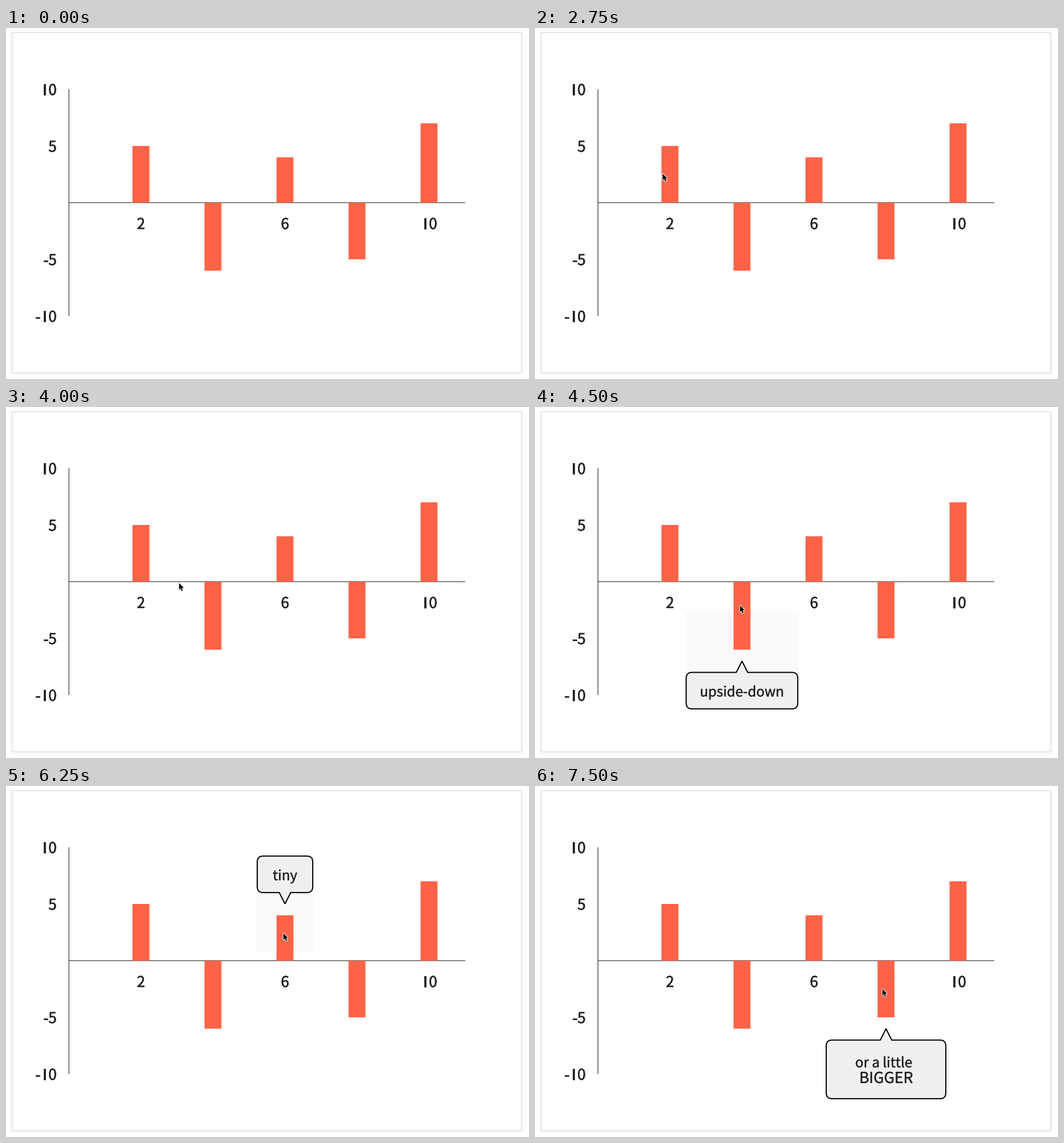
A matplotlib script for the animation above (8000 ms loop, 914 by 613 pixels).

```python
import matplotlib.pyplot as plt
import numpy as np
from matplotlib.animation import FuncAnimation
from matplotlib.patches import PathPatch, Polygon, Rectangle
from matplotlib.path import Path
from matplotlib.patheffects import withStroke

W, H, DPI = 914, 613, 64
PX = 72 / DPI  # points per pixel
INTERVAL, FRAMES = 250, 32
FONT, INK = "Noto Sans CJK JP", "#222222"
LEFT, ZERO, UNIT, BAR_W = 110, 305, 19.8, 29.6
VALUES = {2: 5, 4: -6, 6: 4, 8: -5, 10: 7}

fig = plt.figure(figsize=(W / DPI, H / DPI), dpi=DPI, facecolor="white")
ax = fig.add_axes([0, 0, 1, 1])
ax.set_xlim(0, W)
ax.set_ylim(H, 0)
ax.axis("off")


def bar_x(category):
    return LEFT + 62.93 * category


def level(value):
    return ZERO - UNIT * value


def label(x, y, text, size=26, weight=0.6, z=2):
    """Centred text, thickened a little by an outline."""
    return ax.text(x, y, text, fontsize=size * PX, family=FONT, color=INK,
                   ha="center", va="baseline", zorder=z,
                   path_effects=[withStroke(linewidth=weight * PX, foreground=INK)])


def numeral(x, y, number):
    """Evenly spaced figures, the last one centred on x; a one is a plain bar."""
    for i, ch in enumerate(reversed(str(number))):
        step = 14 * i - 2.5 * (ch == "-")
        label(x - step, y, "I" if ch == "1" else ch)


def rule(xs, ys, color, width=1):
    ax.plot(xs, ys, color=color, lw=width * PX, solid_capstyle="butt",
            solid_joinstyle="miter", snap=False, zorder=1)


def rounded(x0, x1, near, far, x, tip, r=10, notch=10):
    """Rounded box with a pointed notch on its near side."""
    d = np.sign(far - near)
    points = [(x, tip), (x + notch, near)]
    codes = [Path.MOVETO, Path.LINETO]
    for cx, cy, sx, sy in [(x1, near, -1, 1), (x1, far, -1, -1),
                           (x0, far, 1, -1), (x0, near, 1, 1)]:
        ends = [(cx + sx * r, cy), (cx, cy + sy * d * r)]
        if sx * sy > 0:
            ends.reverse()
        points += [ends[0], (cx, cy), ends[1]]
        codes += [Path.LINETO, Path.CURVE3, Path.CURVE3]
    points += [(x - notch, near), (x, tip)]
    return Path(points, codes + [Path.LINETO, Path.CLOSEPOLY])


def bubble(category, *lines):
    """Speech bubble at the end of a bar, and the frames in which it shows."""
    x, value = bar_x(category), VALUES[category]
    d = -np.sign(value)
    half = 7 * max(map(len, lines)) + 20.5
    tip = level(value) + 20 * d
    near = tip + 19.7 * d
    far = near + d * (25 + 38.7 * len(lines))
    parts = [ax.add_patch(PathPatch(rounded(x - half, x + half, near, far, x, tip),
                                    fc="#f0f0f0", ec="black", lw=2 * PX, zorder=4))]
    base = min(near, far) + 36.5 + 5.5 * len(lines)
    for i, text in enumerate(lines):
        shift = -4 * text.endswith(" ")
        parts.append(label(x + shift, base + 27.5 * i, text.strip(),
                           26.5 if text.isupper() else 24, 0.35, 5))
    if len(lines) == 1:  # faint panel behind the bar
        parts.append(ax.add_patch(Rectangle((x - half - 1, far), 2 * half + 2, -168 * d,
                                            fc="#fafafa", zorder=0)))
    first = 6 + 3 * category
    return parts, range(first, first + 4)


# page border, axes and bars
rule([10.5, 901.5, 901.5, 10.5, 10.5], [8, 8, 602.5, 602.5, 8], "#cccccc")
rule([LEFT, LEFT], [level(10), level(-10)], "#333333", 1.2)
rule([LEFT, 802.5], [ZERO, ZERO], "#333333", 1.2)
for category, value in VALUES.items():
    ax.add_patch(Rectangle((bar_x(category) - BAR_W / 2, ZERO), BAR_W, -value * UNIT,
                           fc="#ff6347", lw=0, snap=False, zorder=2))
for value in (10, 5, -5, -10):
    numeral(81.3, level(value) + 10, value)
for category in (2, 6, 10):
    numeral(bar_x(category) + 7 * (category > 9), 351, category)

bubbles = [bubble(2, "right-side-up"), bubble(4, "upside-down"),
           bubble(6, "tiny"), bubble(8, "or a little ", "BIGGER")]

# mouse pointer: soft shadow, white rim, black arrow
ARROW = np.array([(1.2, 1.5), (1.2, 13.2), (3.8, 10.8), (5.6, 15.2), (7.6, 14.4),
                  (5.8, 10.1), (9.5, 10.1)])
layers = []
for drop, color, width, alpha in [(1, "black", 2, 0.15), (0, "white", 2, 1),
                                  (0, "black", 0, 1)]:
    patch = ax.add_patch(Polygon(ARROW, closed=True, fc=color, ec=color, lw=width * PX,
                                 alpha=alpha, joinstyle="miter", zorder=8))
    layers.append((patch, (0, drop)))

# each move: start and end in frames, place reached
START = (-165, 196)
MOVES = [(6, 8, (92.5, 252)), (9, 11.3, (226, 253)), (14.2, 18, (357, 345)),
         (21, 24.5, (483.5, 255.5)), (27, 30, (606, 353))]


def ease(t):
    t = np.clip(t, 0, 1) ** 0.8
    return t * t * (3 - 2 * t)


def pointer(n):
    spot = np.array(START, float)
    for start, end, place in MOVES:
        spot += (np.array(place) - spot) * ease((n - start) / (end - start))
    return spot


def update(n):
    for patch, offset in layers:
        patch.set_xy(ARROW + offset + pointer(n))
    for parts, shown in bubbles:
        for part in parts:
            part.set_visible(n in shown)
    return []


anim = FuncAnimation(fig, update, frames=FRAMES, interval=INTERVAL, repeat=True,
                     repeat_delay=0, blit=False)
plt.show()
```
